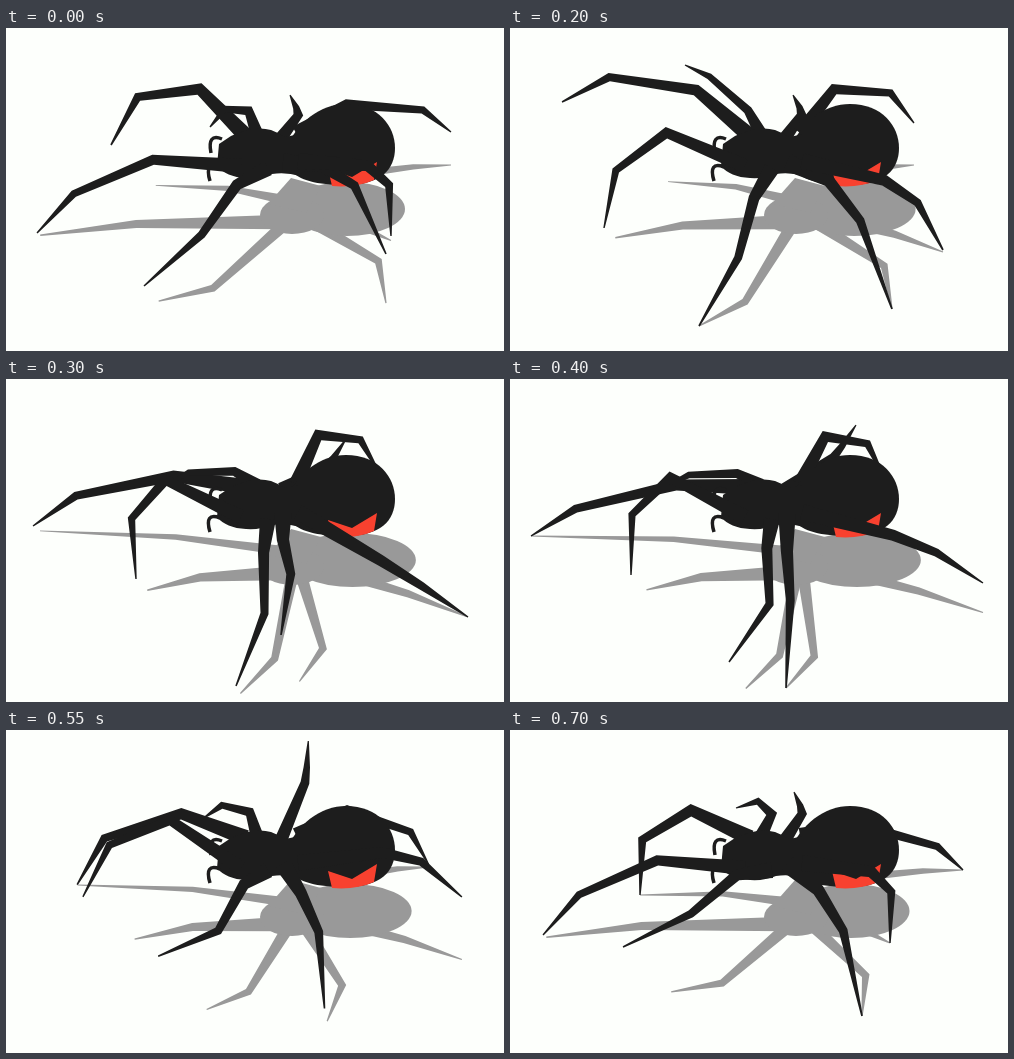
An HTML page for the animation above (0.75 s loop, 498 by 323 pixels).

```html
<!DOCTYPE html>
<html lang="en">
<head>
<meta charset="utf-8">
<title>Walking spider</title>
<style>
  html, body { margin: 0; width: 100%; height: 100%; overflow: hidden; background: #fdfffc; }
  svg { display: block; width: 100%; height: 100%; }
  .dark { fill: #1d1d1d; }
  .shade { fill: #999; }
</style>
</head>
<body>
<svg viewBox="0 0 498 323" preserveAspectRatio="none">
  <g class="shade">
    <g id="shadows"></g>
    <ellipse id="belly" cy="181" ry="27"/>
    <ellipse cx="286" cy="187" rx="32" ry="19"/>
    <path d="M262 176L285 150L315 158L300 185Z"/>
  </g>
  <g id="far" class="dark"></g>
  <g class="dark">
    <path d="M280 122C290 94 315 76 340 76C372 76 389 98 389 120C389 142 374 157 340 157C310 157 293 152 284 142Z"/>
    <path d="M211 138L213 116L225 108Q248 97 265 102Q273 105 279 109L294 106V148Q280 144 266 146Q254 151 240 150Q220 149 211 138Z"/>
    <path d="M216 111Q201 105 205 125M214 139Q198 133 204 153" fill="none" stroke="#1d1d1d" stroke-width="3.5"/>
  </g>
  <path d="M322 141L346 149L371 134L368 152Q350 160 326 158Z" fill="#f8412f"/>
  <g id="near" class="dark"></g>
</svg>
<script>
const STEP = 50, COUNT = 15;
const KEYS = [0, 4, 6, 8, 10, 13, 14];
const LEFT = -1, RIGHT = 1;

// tips: the foot's path. knee, ankle: [place along the leg, fold].
// A leg folds more the closer its foot comes, and by spread the further it reaches sideways.
// shade: hip of the shadow, ground line y = base + slope * x, bend of the shadow.
const legs = [
  { group: "far", side: LEFT, hip: [240, 108], width: 10, reach: 235, knee: [0.32, 0.26], ankle: [0.78, 0.24],
    tips: [[105, 117], [52, 74], [27, 147], [21, 157], [54, 163], [107, 138], [130, 165]],
    shade: { hip: [280, 172], base: 150, slope: 0.07, bend: [0.45, 5], width: 6 } },
  { group: "far", side: LEFT, hip: [251, 106], width: 8, reach: 110, knee: [0.25, 0.22], ankle: [0.75, 0.2],
    tips: [[204, 99], [175, 37], [160, 106], [155, 107], [188, 94], [210, 80], [226, 78]] },
  { group: "far", side: RIGHT, hip: [275, 110], width: 8, reach: 130, knee: [0.6, -0.1], ankle: [0.75, -0.07],
    tips: [[284, 67], [283, 67], [340, 60], [346, 46], [313, 7], [286, 37], [284, 62]] },
  { group: "far", side: RIGHT, hip: [290, 105], width: 9, reach: 185, knee: [0.33, 0.28], ankle: [0.82, 0.22],
    tips: [[445, 104], [404, 95], [374, 95], [375, 100], [410, 130], [444, 136], [453, 140]],
    shade: { hip: [320, 150], base: 137, slope: 0, bend: [0.7, 2], width: 6 } },
  { group: "near", side: LEFT, hip: [235, 138], width: 9, reach: 235, knee: [0.38, 0.35], ankle: [0.78, 0.27],
    tips: [[31, 205], [94, 200], [130, 200], [121, 196], [94, 168], [42, 178], [33, 205]],
    shade: { hip: [275, 194], base: 206, slope: 0.04, bend: [0.6, 6], width: 9 } },
  { group: "near", side: LEFT, hip: [262, 140], width: 10, reach: 185, knee: [0.2, -0.08], ankle: [0.55, -0.25], spread: 0.12,
    tips: [[138, 258], [189, 298], [230, 307], [219, 283], [174, 236], [113, 217], [113, 217]],
    shade: { hip: [288, 188], base: 211, slope: 0.45, bend: [0.67, -18], width: 8 } },
  { group: "near", side: RIGHT, hip: [277, 134], width: 11, reach: 185, knee: [0.22, 0], ankle: [0.5, 0.06], spread: 0.22,
    tips: [[380, 226], [382, 281], [275, 256], [276, 309], [308, 281], [337, 282], [352, 286]],
    shade: { hip: [292, 186], base: 374, slope: -0.26, bend: [0.72, 24], width: 8 } },
  { group: "near", side: RIGHT, hip: [292, 133], width: 10, reach: 200, knee: [0.48, 0.25], ankle: [0.72, 0.24],
    tips: [[385, 208], [433, 222], [462, 238], [473, 204], [470, 155], [416, 211], [380, 213]],
    shade: { hip: [310, 187], base: 120, slope: 0.24, bend: [0.6, 3], width: 8 } }
];

function addPath(group) {
  const path = document.createElementNS("http://www.w3.org/2000/svg", "path");
  document.getElementById(group).append(path);
  return path;
}
for (const leg of legs) {
  leg.path = addPath(leg.group);
  if (leg.shade) leg.shade.path = addPath("shadows");
}

// Cyclic Hermite curve through the foot's key points.
function tipAt(tips, step) {
  const n = KEYS.length;
  const time = i => KEYS[(i + n) % n] + COUNT * Math.floor(i / n);
  const tip = i => tips[(i + n) % n];
  let k = n - 1;
  while (KEYS[k] > step) k--;
  const span = time(k + 1) - time(k), u = (step - time(k)) / span;
  const h = u * u * (3 - 2 * u), a = u * (1 - u) * (1 - u), b = u * u * (u - 1);
  return tip(k).map((p, j) => {
    const slope = i => (tip(i + 1)[j] - tip(i - 1)[j]) / (time(i + 1) - time(i - 1));
    return p + (tip(k + 1)[j] - p) * h + span * (slope(k) * a + slope(k + 1) * b);
  });
}

// Point at part u of the line from a to b, pushed off it by rise.
function offLine(a, b, u, rise, side) {
  const dx = b[0] - a[0], dy = b[1] - a[1], r = side * rise / Math.hypot(dx, dy);
  return [a[0] + dx * u + dy * r, a[1] + dy * u - dx * r];
}

function joints({ hip, side, reach, knee, ankle, spread = 0 }, tip) {
  const dx = tip[0] - hip[0], dy = tip[1] - hip[1];
  const slack = Math.sqrt(Math.max(0, reach * reach - dx * dx - dy * dy));
  const joint = ([u, fold]) => offLine(hip, tip, u, fold * slack + spread * Math.abs(dx), side);
  return [hip, joint(knee), joint(ankle), tip];
}

// The light hangs over the abdomen's side, so raised feet cast shadows towards it.
function shadowJoints({ side, shade: { hip, base, slope, bend } }, [x, y]) {
  const ground = Math.max(y, base + slope * x);
  const tip = [x + Math.max(0, 1.55 - 0.0042 * x) * (ground - y), ground];
  return [hip, offLine(hip, tip, ...bend, side), tip];
}

// Tapered outline with mitred joints.
function outline(pts, width) {
  const taper = pts.length > 3 ? [1.6, 1.1, 0.8, 0.15] : [1.6, 0.9, 0.15];
  const dirs = pts.slice(1).map(([x, y], i) => Math.atan2(y - pts[i][1], x - pts[i][0]));
  const left = [], right = [];
  pts.forEach(([x, y], i) => {
    const from = dirs[Math.max(i - 1, 0)], to = dirs[Math.min(i, dirs.length - 1)];
    const half = Math.atan2(Math.sin(to - from), Math.cos(to - from)) / 2;
    const r = width * taper[i] / 2 / Math.max(Math.cos(half), 0.6);
    const dx = -Math.sin(from + half) * r, dy = Math.cos(from + half) * r;
    left.push([x + dx, y + dy]);
    right.unshift([x - dx, y - dy]);
  });
  return "M" + [...left, ...right].map(p => p.map(v => v.toFixed(1)).join(" ")).join("L") + "Z";
}

const belly = document.getElementById("belly");
let shown = -1;

function draw(now) {
  const step = Math.floor(now / STEP) % COUNT;
  if (step !== shown) {
    shown = step;
    for (const leg of legs) {
      const tip = tipAt(leg.tips, step);
      leg.path.setAttribute("d", outline(joints(leg, tip), leg.width));
      if (leg.shade) leg.shade.path.setAttribute("d", outline(shadowJoints(leg, tip), leg.shade.width));
    }
    const edge = 405 - 6 * Math.cos(2 * Math.PI * step / COUNT);
    belly.setAttribute("cx", (edge + 283) / 2);
    belly.setAttribute("rx", (edge - 283) / 2);
  }
  requestAnimationFrame(draw);
}
draw(performance.now());
</script>
</body>
</html>
```
